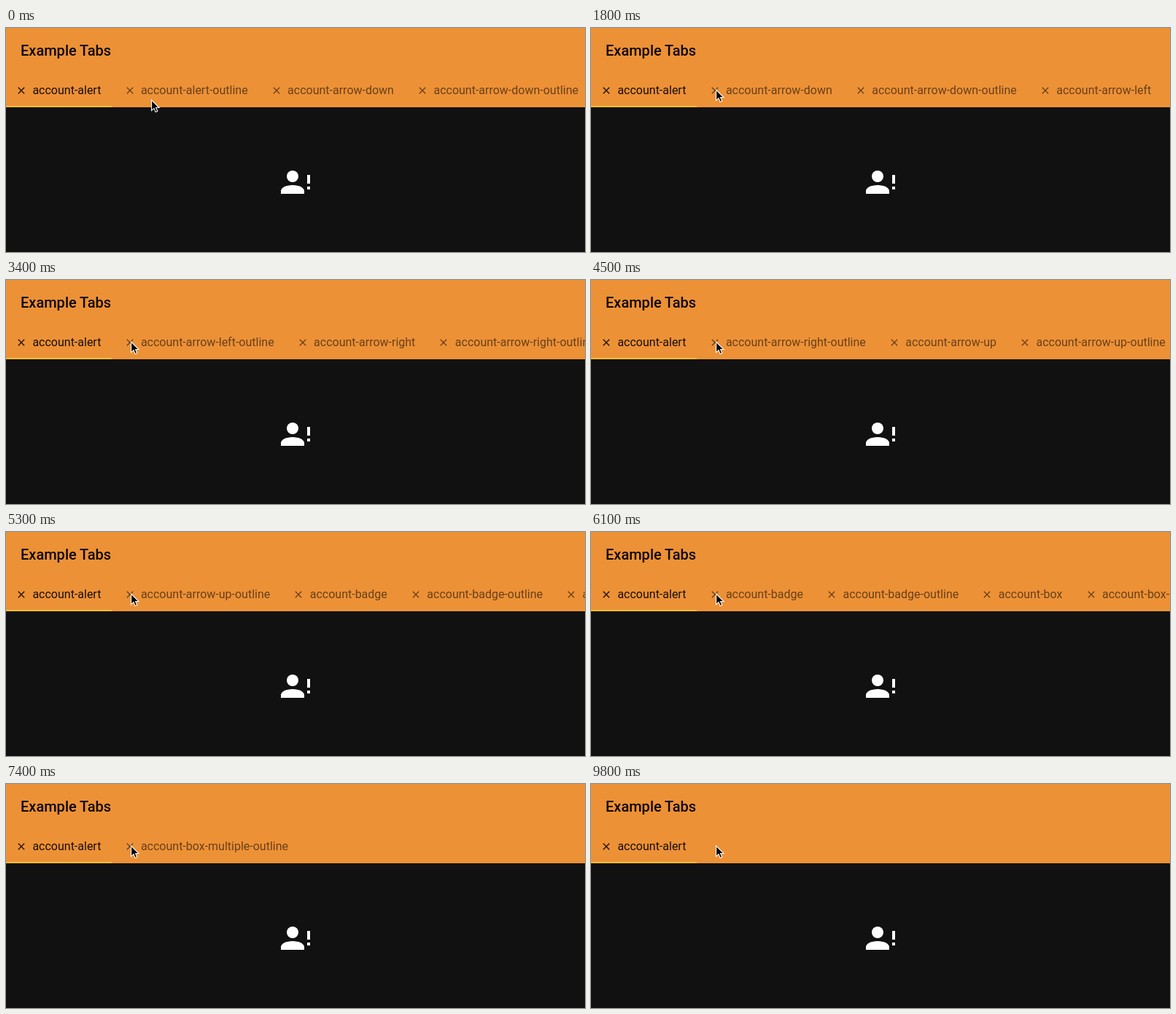
An HTML page that plays this animation: 794 by 308 pixels, repeating every 10000 ms.

```html
<!DOCTYPE html>
<html lang="en">
<head>
<meta charset="utf-8">
<title>Example Tabs</title>
<style>
  html, body { margin: 0; width: 100%; height: 100%; overflow: hidden; background: #111; }
  #stage { position: relative; width: 794px; height: 308px; overflow: hidden; font: 16px/19px Roboto, sans-serif; }
  header { position: absolute; inset: 0 0 auto; height: 109px; background: #ed9137; }
  h1 { position: absolute; left: 20px; top: 19px; margin: 0; font-size: 20px; font-weight: 500; line-height: 24px; color: #0c0703; }
  #tabs { position: absolute; left: 0; top: 76px; display: flex; white-space: nowrap; }
  .tab { position: relative; flex: none; padding: 0 18.1px 0 36.4px; color: rgba(0, 0, 0, .56); }
  .tab:first-child { color: rgba(0, 0, 0, .9); }
  .tab svg { position: absolute; left: 13px; top: 2px; }
  #ink { position: absolute; left: 0; top: 107px; width: 145px; height: 2px; background: #f9bd2f; }
  #person { position: absolute; left: 373px; top: 188px; }
  #cursor { position: absolute; left: 0; top: 0; overflow: visible; }
</style>
</head>
<body>
<div id="stage">
  <header>
    <h1>Example Tabs</h1>
    <div id="tabs"></div>
    <div id="ink"></div>
  </header>
  <svg id="person" width="48" height="48" viewBox="0 0 24 24" fill="#fff">
    <circle cx="10" cy="8" r="4"/>
    <path d="M10 14C14.42 14 18 15.79 18 18V20H2V18C2 15.79 5.58 14 10 14M20 7H22V13H20ZM20 15H22V17H20Z"/>
  </svg>
  <svg id="cursor" width="14" height="20">
    <path d="M.6 1V15.6L4 12.4L6.2 17.6L8.8 16.5L6.6 11.5H11Z" stroke="#fff" stroke-width="1.1"/>
  </svg>
</div>
<script>
const LOOP = 10000, STEP = 100;
const withOutline = name => [name, name + "-outline"];
const names = [
  "alert", "arrow-down", "arrow-left", "arrow-right", "arrow-up", "badge"
].flatMap(withOutline).concat("box", withOutline("box-multiple"));

// When each tab after the first is closed, in ms.
const closeTimes = [1100, 2000, 2600, 3200, 3500, 4200, 4700, 5200, 5800, 6200, 6500, 6800, 7300, 8100];

const closeIcon = `<svg width="16" height="16" viewBox="0 0 24 24" stroke="currentColor" stroke-width="2">
  <path d="M5.7 5.7 18.3 18.3M18.3 5.7 5.7 18.3"/></svg>`;
const tabBar = document.getElementById("tabs");
const cursor = document.getElementById("cursor");

tabBar.innerHTML = names.map(name => `<div class="tab">${closeIcon}account-${name}</div>`).join("");
const closable = [...tabBar.children].slice(1);

function draw(time) {
  const t = Math.floor(time % LOOP / STEP) * STEP;
  closable.forEach((tab, i) => tab.style.display = t < closeTimes[i] ? "" : "none");

  const p = Math.min(t / 600, 1);
  const eased = p * p * (3 - 2 * p);
  cursor.style.transform = `translate(${Math.round(199 - 28 * eased)}px, ${Math.round(98 - 14 * eased)}px)`;
}

const start = performance.now();
function tick() {
  draw(performance.now() - start);
  requestAnimationFrame(tick);
}
tick();
</script>
</body>
</html>
```
